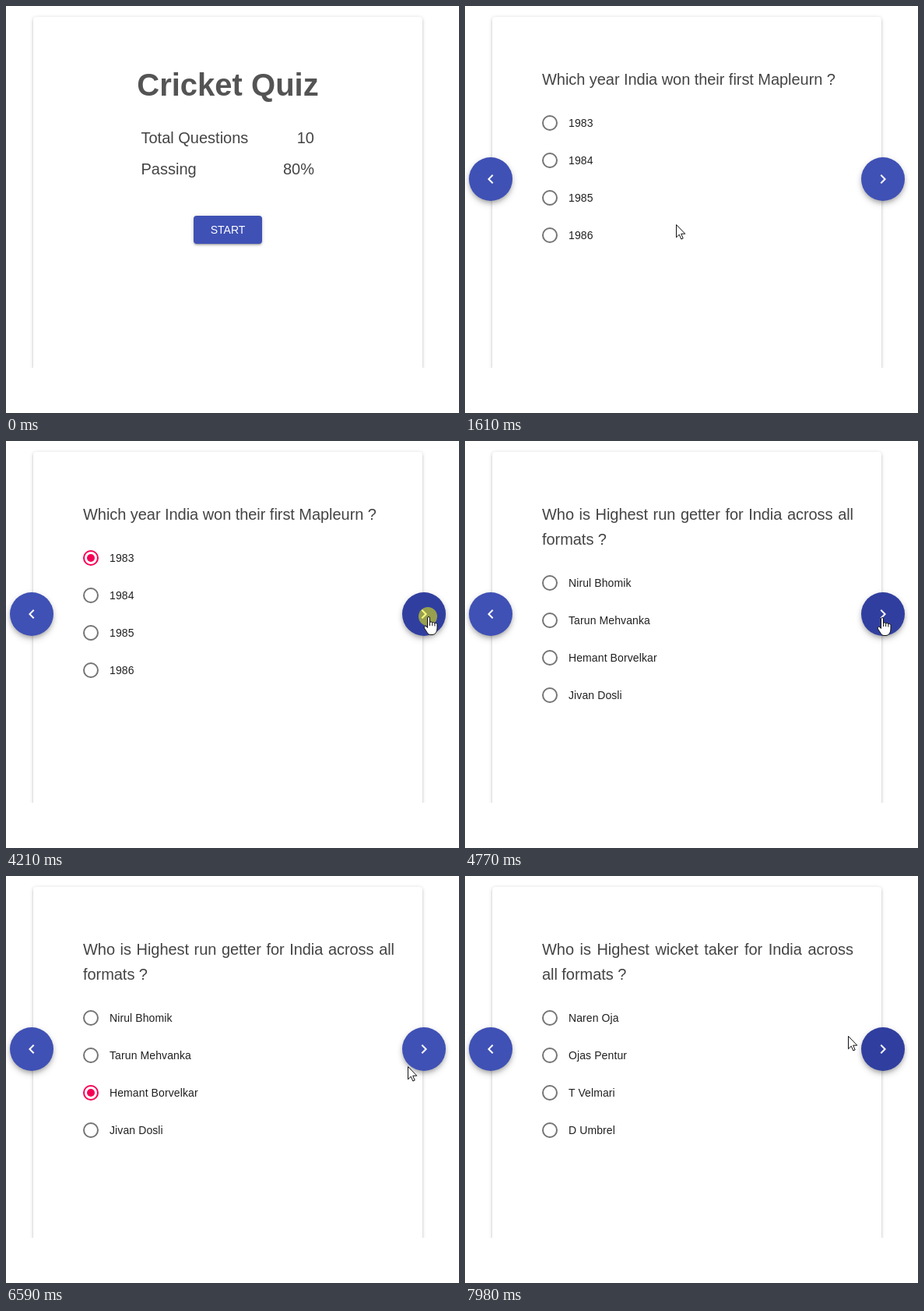
Animation of 582x522 px, one loop 8 s. Source, as an HTML page:

```html
<!DOCTYPE html>
<html lang="en">
<head>
<meta charset="utf-8">
<title>Quiz</title>
<style>
  html, body { margin: 0; width: 100%; height: 100%; overflow: hidden; background: #fff; }
  body { position: relative; font-family: "Liberation Sans", Arial, sans-serif; color: #444; }
  div, h1, svg { position: absolute; margin: 0; white-space: nowrap; }
  #frame { left: 0; top: 0; width: 582px; height: 464px; overflow: hidden; }
  #card {
    left: 35px; top: 14px; width: 500px; height: 480px; border-radius: 4px; background: #fff;
    box-shadow: 0 1px 5px rgba(0,0,0,.2), 0 2px 2px rgba(0,0,0,.14), 0 3px 1px -2px rgba(0,0,0,.12);
  }
  .page { left: 0; top: 0; width: 582px; height: 464px; }
  h1 { left: 35px; width: 500px; top: 78px; font-size: 40px; line-height: 46px; text-align: center; color: #545454; }
  .row { left: 173.5px; width: 222.5px; font-size: 20px; line-height: 24px; display: flex; justify-content: space-between; }
  .row span { display: block; }
  .question { left: 99px; top: 78px; width: 400px; font-size: 20px; line-height: 32px; letter-spacing: -.05px; white-space: normal; text-align: justify; }
  .label { left: 133px; font-size: 14px; line-height: 20px; letter-spacing: .1px; color: #212121; }
  .radio { left: 99px; width: 20px; height: 20px; box-sizing: border-box; border: 2px solid #757575; border-radius: 50%; }
  .radio.on { border-color: #f50057; }
  .radio.on::after { content: ""; position: absolute; inset: 3px; border-radius: 50%; background: #f50057; }
  .button { overflow: hidden; background: #3f51b5; color: #fff; }
  .button.hover { background: #303f9f; }
  #start {
    left: 241px; top: 269px; width: 88px; height: 36px; border-radius: 4px;
    font-size: 14px; line-height: 36px; text-align: center;
    box-shadow: 0 1px 5px rgba(0,0,0,.2), 0 2px 2px rgba(0,0,0,.14), 0 3px 1px -2px rgba(0,0,0,.12);
  }
  .fab {
    top: 194px; width: 56px; height: 56px; border-radius: 50%;
    box-shadow: 0 3px 5px -1px rgba(0,0,0,.2), 0 5px 9px rgba(0,0,0,.14), 0 1px 8px rgba(0,0,0,.08);
  }
  #prev { left: 5px; }
  #next { left: 509px; }
  .fab svg { left: 16px; top: 16px; fill: #fff; }
  .ripple { width: 112px; height: 112px; margin: -56px; border-radius: 50%; background: #fff; opacity: 0; }
  #cursor { left: 0; top: 0; width: 0; height: 0; }
  #press { left: -12px; top: -12px; width: 24px; height: 24px; border-radius: 50%; background: rgba(255,255,0,.5); }
  #cursor svg { left: 0; top: 0; width: 1px; height: 1px; overflow: visible; fill: #fff; stroke: #111; stroke-width: 1; stroke-linejoin: round; }
  #cursor #hand { left: 1px; }
</style>
</head>
<body>
<div id="frame"><div id="card"></div></div>
<div class="page">
  <h1>Cricket Quiz</h1>
  <div class="row" style="top:157px"><span>Total Questions</span><span>10</span></div>
  <div class="row" style="top:197px"><span>Passing</span><span>80%</span></div>
  <div id="start" class="button">START<div class="ripple" style="left:30px;top:11px"></div></div>
</div>
<div id="fabs">
  <div id="prev" class="button fab">
    <svg width="24" height="24"><path d="M15.41 7.41 14 6l-6 6 6 6 1.41-1.41L10.83 12z"/></svg>
  </div>
  <div id="next" class="button fab">
    <svg width="24" height="24"><path d="M10 6 8.59 7.41 13.17 12l-4.58 4.59L10 18l6-6z"/></svg>
    <div class="ripple"></div>
  </div>
</div>
<div id="cursor">
  <div id="press"></div>
  <svg id="arrow"><path d="M.5 .5V16.8L4.3 13.2 6.8 19 9.2 18 6.7 12.2H11.8Z"/></svg>
  <svg id="hand">
    <path d="M-1.5 13V2Q-1.5 .5 0 .5T1.5 2V8Q1.7 6.8 3 6.8 4.7 6.8 4.7 8.6 4.9 7.4 6.2 7.5 7.9 7.6 7.9 9.3 8.2 8.4 9.4 8.5 11 8.7 11 10.4V15Q11 18.5 9.5 20.5 8 23.5 5 23.5H2Q-.5 23.5-2 20.5L-5.6 15Q-6.6 12.4-4.6 12.2-2.8 12-1.5 14.5Z"/>
    <path fill="none" d="M1.5 8v4M4.7 8.6V12M7.9 9.3v3.2"/>
  </svg>
</div>
<script>
const LOOP = 8000;
const $ = selector => document.querySelector(selector);

const quiz = [
  { text: 'Which year India won their first Mapleurn ?', top: 150,
    options: ['1983', '1984', '1985', '1986'], answer: 0, answeredAt: 2880 },
  { text: 'Who is Highest run getter for India across all formats ?', top: 182,
    options: ['Nirul Bhomik', 'Tarun Mehvanka', 'Hemant Borvelkar', 'Jivan Dosli'], answer: 2, answeredAt: 5970 },
  { text: 'Who is Highest wicket taker for India across all formats ?', top: 182,
    options: ['Naren Oja', 'Ojas Pentur', 'T Velmari', 'D Umbrel'] }
];
const pageStarts = [0, 1520, 4400, 7420];
const presses = [[1290, 1440], [2730, 2880], [4210, 4340], [5820, 5970], [7230, 7390]];
const hovers = [[4210, 4880], [7390, LOOP]];

// time, x, y, pointer shape held until the next key
const path = [
  [370, 468, 505, 'arrow'], [550, 345, 365, 'arrow'], [640, 290, 300, 'hand'], [730, 271, 280, 'hand'],
  [1600, 271, 280, 'arrow'], [1880, 271, 280, 'arrow'], [2080, 190, 215, 'arrow'], [2200, 146, 170, 'hand'],
  [2260, 138, 162, 'hand'], [2350, 155, 152, 'hand'], [3085, 155, 152, 'hand'], [3130, 195, 156, 'arrow'],
  [3290, 410, 180, 'arrow'], [3490, 410, 180, 'arrow'], [3720, 511, 214, 'hand'], [3880, 542, 225, 'hand'],
  [4740, 542, 225, 'hand'], [4880, 509, 229, 'arrow'], [5270, 255, 263, 'arrow'], [5350, 225, 267, 'hand'],
  [5490, 200, 270, 'hand'], [6120, 200, 270, 'hand'], [6240, 250, 267, 'arrow'], [6480, 480, 250, 'arrow'],
  [6590, 516, 244, 'arrow'], [6770, 526, 238, 'arrow'], [6820, 526, 238, 'hand'], [6870, 534, 216, 'hand'],
  [7660, 534, 216, 'hand'], [7830, 508, 208, 'arrow'], [7980, 492, 205, 'arrow']
];

function addDiv(parent, className, text = '') {
  const div = document.createElement('div');
  div.className = className;
  div.textContent = text;
  parent.append(div);
  return div;
}

for (const item of quiz) {
  const page = addDiv(document.body, 'page');
  addDiv(page, 'question', item.text);
  item.options.forEach((option, i) => {
    const top = item.top + 48 * i - 10 + 'px';
    const radio = addDiv(page, 'radio');
    radio.style.top = top;
    addDiv(page, 'label', option).style.top = top;
    if (i === item.answer) item.radio = radio;
  });
}
document.body.append($('#fabs'), $('#cursor'));

const pages = document.querySelectorAll('.page');
const show = (element, visible) => { element.style.display = visible ? '' : 'none'; };
const within = (spans, t) => spans.some(([from, to]) => t >= from && t < to);

function drawRipple(element, t, start, length) {
  const p = (t - start) / length;
  const active = p >= 0 && p < 1;
  element.style.opacity = active ? 0.3 * (1 - p) : 0;
  element.style.transform = `scale(${active ? 0.2 + 0.8 * p : 0})`;
}

function drawCursor(t) {
  const index = path.findLastIndex(key => key[0] <= t);
  show($('#cursor'), index >= 0);
  if (index < 0) return;
  const [t0, x0, y0, shape] = path[index];
  const [t1, x1, y1] = path[index + 1] || [LOOP, x0, y0];
  const p = (t - t0) / (t1 - t0);
  const x = Math.round(x0 + (x1 - x0) * p);
  const y = Math.round(y0 + (y1 - y0) * p);
  $('#cursor').style.transform = `translate(${x}px, ${y}px)`;
  show($('#arrow'), shape === 'arrow');
  show($('#hand'), shape === 'hand');
  show($('#press'), within(presses, t));
}

function draw(t) {
  const current = pageStarts.findLastIndex(start => start <= t);
  pages.forEach((page, i) => show(page, i === current));
  show($('#fabs'), current > 0);
  for (const { radio, answeredAt } of quiz) {
    if (radio) radio.classList.toggle('on', t >= answeredAt);
  }
  $('#start').classList.toggle('hover', t >= 1440);
  $('#next').classList.toggle('hover', within(hovers, t));
  drawRipple($('#start .ripple'), t, 1440, 200);

  const second = t >= 7000;
  const ripple = $('#next .ripple');
  ripple.style.left = (second ? 25 : 33) + 'px';
  ripple.style.top = (second ? 22 : 31) + 'px';
  drawRipple(ripple, t, second ? 7390 : 4340, second ? 160 : 280);
  drawCursor(t);
}

const begin = performance.now();
function tick() {
  draw((performance.now() - begin) % LOOP);
  requestAnimationFrame(tick);
}
tick();
</script>
</body>
</html>
```
